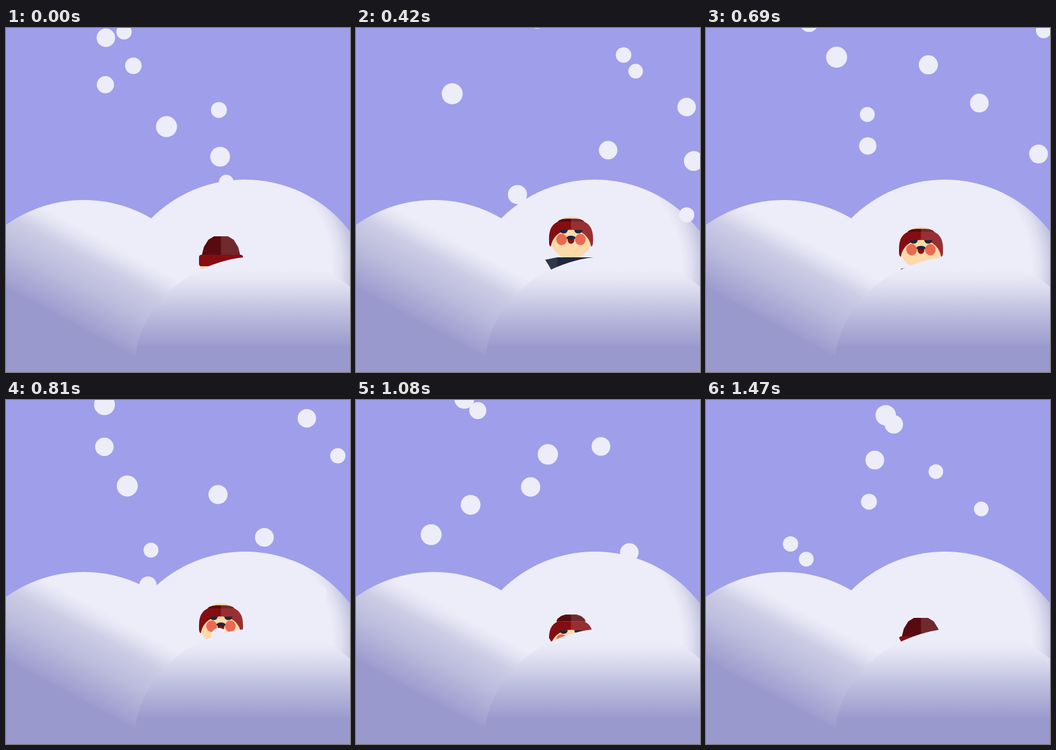
An HTML page with a canvas that plays this animation: 540 px wide and 540 px high, repeating every 1.53 s.

```html
<!DOCTYPE html>
<html lang="en">
<head>
<meta charset="utf-8">
<title>Snowy hills</title>
<style>
  html, body { margin: 0; width: 100%; height: 100%; overflow: hidden; background: #9f9eea; }
  canvas { display: block; }
</style>
</head>
<body>
<canvas id="stage" width="540" height="540"></canvas>
<script>
const ctx = document.getElementById('stage').getContext('2d');
const LOOP = 1530, STEP = 30, LAST = 1470;
const SNOW = '#ededf9', SHADE = '#9a99cd', INK = '#1f2638';

// Each snowball: birth time (ms), starting x, radius
const balls = [
  [-58, 158, 14.5], [-44, 186, 12], [-122, 205.5, 13], [-163, 166, 13.5],
  [-248, 275, 16.5], [-215, 351.5, 12.5], [-305, 371, 15.5], [-351, 392, 11.5],
  [47, 305.6, 15], [127, 428, 14.5], [322, 423.6, 12.2], [286, 445.7, 11.5],
  [211, 535.4, 14.5], [107, 567, 15.5], [12, 581.5, 12], [238, 163.4, 16.5],
  [668, 162, 14.5], [587, 209, 16.5], [570, 354.4, 15], [489, 444.2, 14.7],
  [466, 272, 11.7], [405, 284.4, 13.6], [390, 555.8, 14.7], [649, 530.6, 12],
  [922, 310.5, 16], [939, 392, 14.7], [855, 293.1, 15.2], [820, 205.3, 15.5],
  [764, 155.4, 16.4], [732, 474.5, 14.5], [1137, 174.3, 12], [1110, 206, 11.6],
  [1048, 170.4, 15.6], [1020, 192.5, 13.4], [1202, 459, 11.5], [1399, 284, 16],
  [1378, 298, 14.5], [1300, 275.8, 14.7], [1216, 280, 12.5], [1276, 375, 11.5]
];

// Time, height of the hat brim, backward tilt of the head
const poses = [
  [0, 356, 0], [180, 304, .76], [300, 300.5, 1], [420, 304, 1], [690, 320, 1],
  [960, 337, 1], [1230, 361, .36], [1470, 371, 0]
];

function slope(i, k) {
  const a = poses[Math.max(i - 1, 0)], b = poses[Math.min(i + 1, poses.length - 1)];
  return (b[k] - a[k]) / (b[0] - a[0]);
}

function poseAt(t, k) {
  let i = 0;
  while (i < poses.length - 2 && t >= poses[i + 1][0]) i++;
  const a = poses[i], b = poses[i + 1], d = b[0] - a[0], u = (t - a[0]) / d, v = 1 - u;
  return v * v * (1 + 2 * u) * a[k] + u * u * (3 - 2 * u) * b[k]
    + d * u * v * (v * slope(i, k) - u * slope(i + 1, k));
}

function ellipse(x, y, rx, ry, fill, end = Math.PI * 2) {
  ctx.fillStyle = fill;
  ctx.beginPath();
  ctx.ellipse(x, y, rx, ry, 0, 0, end);
  ctx.fill();
}

function polygon(points, fill) {
  ctx.fillStyle = fill;
  ctx.beginPath();
  for (const [x, y] of points) ctx.lineTo(x, y);
  ctx.closePath();
  ctx.fill();
}

function withStops(gradient, stops) {
  for (const [at, color] of stops) gradient.addColorStop(at, color);
  return gradient;
}

const backFill = withStops(ctx.createRadialGradient(345, 375, 166, 345, 375, 206),
  [[0, SNOW], [.4, '#dfdff0'], [1, '#b9b9da']]);
const leftFill = withStops(ctx.createLinearGradient(122, 315, 56, 438),
  [[0, SNOW], [.12, '#e2e2f2'], [.27, '#cdcde6'], [.6, '#babadc'], [.96, '#9f9ed0'], [1, SHADE]]);
const frontFill = withStops(ctx.createLinearGradient(0, 380, 0, 500),
  [[0, SNOW], [.2, '#e0e0f1'], [.5, '#c3c3e1'], [.8, '#aaaad4'], [.98, '#9d9ccf'], [1, SHADE]]);

// Left colour over the whole shape, right half tinted lighter
function twoTone(path, fill, tint) {
  ctx.fillStyle = fill;
  ctx.fill(path);
  ctx.save();
  ctx.beginPath();
  ctx.rect(0, -60, 60, 160);
  ctx.clip();
  ctx.fillStyle = `rgba(255,220,220,${tint})`;
  ctx.fill(path);
  ctx.restore();
}

function drawHat(tilt, bend) {
  const h = 30 - 25 * tilt, k = 1 - .3 * tilt;
  const half = [[30, 0], [27, .4], [20, .78], [11, .97]].map(([x, y]) => [x * k, -y * h]);
  const outline = [...half.map(([x, y]) => [-x, y]), ...half.reverse()];
  const dome = new Path2D();
  for (const [x, y] of outline) dome.lineTo(x, y);
  dome.closePath();
  twoTone(dome, '#570b10', .15);

  const brim = new Path2D(), top = 30.5 - 10 * bend, foot = 18 + 21 * bend;
  const shoulder = 4 + 22 * bend, cheek = 14 + 18 * bend, arch = 18 - 14 * bend;
  brim.moveTo(-34.5, shoulder);
  brim.quadraticCurveTo(-34.5, 6 * bend, -top, 0);
  brim.lineTo(top, 0);
  brim.quadraticCurveTo(34.5, 6 * bend, 34.5, shoulder);
  brim.lineTo(34.5, cheek);
  brim.quadraticCurveTo(34.5, foot, 31.5, foot);
  brim.bezierCurveTo(26, arch, -26, arch, -31.5, foot);
  brim.quadraticCurveTo(-34.5, foot, -34.5, cheek);
  brim.closePath();
  twoTone(brim, '#850d11', .16 * bend);
}

function drawSinger(t) {
  const tilt = Math.min(1, Math.max(0, poseAt(t, 2)));
  const bend = Math.min(1, tilt * 1.3), drop = 25 * (1 - bend);
  const neck = 53 + 12 * (tilt - .76);
  ctx.save();
  ctx.translate(337.5, poseAt(t, 1));
  ellipse(0, 25, 33, 33, '#fcd9a8');
  for (const side of [-1, 1]) ellipse(side * 14.7, 28 + drop, 8.4, 9, '#e96a51');
  ellipse(0, 28.5 + drop, 5.3, 6.2, '#8b1014');
  ellipse(0, 25.3 + drop, 7, 3.2, INK);
  polygon([[-22, neck], [38, neck], [38, neck + 50], [-22, neck + 50]], '#1f273b');
  polygon([[-41.5, neck + 4], [-21.5, neck], [-21.5, neck + 30], [-32.5, neck + 28]], '#2d384a');
  drawHat(tilt, bend);
  if (bend > .6) {
    for (const side of [-1, 1]) ellipse(side * 11.5, 13 + drop, 6.3, 5.5, INK, Math.PI);
  }
  ctx.restore();
}

function drawBalls(t) {
  for (const [born, x, r] of balls) {
    const age = t - born;
    if (age < 0) continue;
    const pull = .000375 * age * age;
    ellipse(x - pull, -22 + .62 * age + pull, r, r, SNOW);
  }
}

function frame(now) {
  const t = Math.min(Math.floor(now % LOOP / STEP) * STEP, LAST);
  ctx.fillStyle = '#9f9eea';
  ctx.fillRect(0, 0, 540, 540);
  ellipse(375, 446, 208, 208, backFill);
  drawSinger(t);
  drawBalls(t);
  ellipse(122, 480, 210, 210, leftFill);
  ellipse(402, 532, 200, 174, frontFill);
  requestAnimationFrame(frame);
}
frame(performance.now());
</script>
</body>
</html>
```
